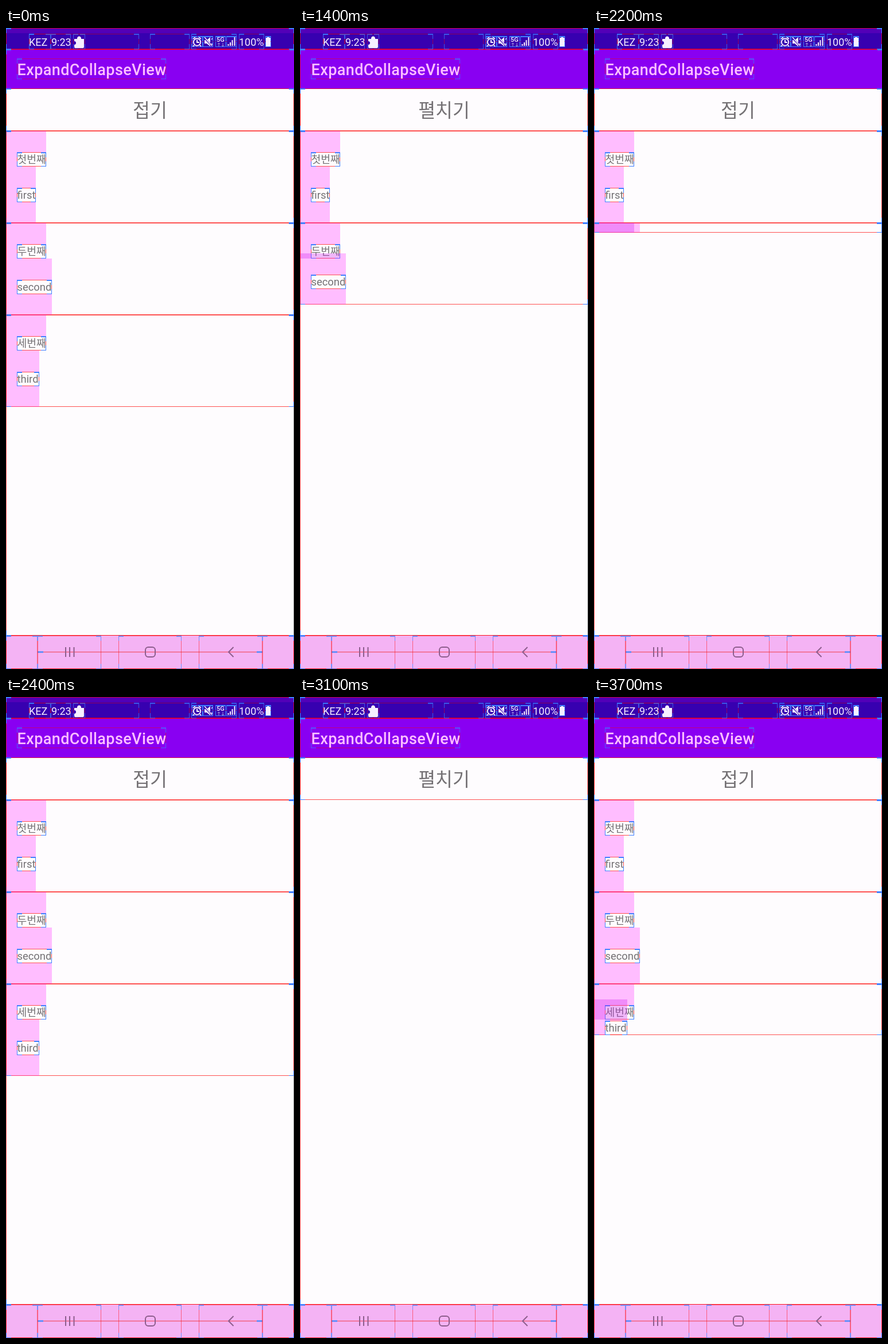
Animation, 502 px wide and 1115 px high, one loop 3800 ms. Source, as an HTML page:

```html
<!DOCTYPE html>
<html lang="ko">
<head>
<meta charset="utf-8">
<title>ExpandCollapseView</title>
<style>
@property --open-height { syntax: "<length>"; inherits: true; initial-value: 480px; }
@property --open { syntax: "<number>"; inherits: true; initial-value: 1; }

html, body { margin: 0; width: 100%; height: 100%; overflow: hidden; background: #fefcfe; }
body { font: 18.4px Roboto, "Noto Sans CJK KR", "Noto Sans CJK JP", sans-serif; color: #747174; }
#stage {
  position: relative; width: 502px; height: 1115px; overflow: hidden;
  background: linear-gradient(#999 0 0) 100% 0 / 1px 100% no-repeat;
  animation: toggle 3800ms step-end infinite;
}
#stage > *, .row > * { position: absolute; }

/* Accelerate-decelerate over 300 ms, sampled every 100 ms */
@keyframes toggle {
  0%      { --open-height: 480px; --open: 1; }
  34.21%  { --open-height: 472px; --open: 0; }
  36.84%  { --open-height: 302px; --open: 0; }
  39.47%  { --open-height: 70px;  --open: 0; }
  42.10%  { --open-height: 0px;   --open: 0; }
  55.26%  { --open-height: 7px;   --open: 1; }
  57.89%  { --open-height: 177px; --open: 1; }
  60.52%  { --open-height: 409px; --open: 1; }
  63.15%  { --open-height: 480px; --open: 1; }
  73.68%  { --open-height: 472px; --open: 0; }
  76.31%  { --open-height: 302px; --open: 0; }
  78.94%  { --open-height: 70px;  --open: 0; }
  81.57%  { --open-height: 0px;   --open: 0; }
  92.10%  { --open-height: 7px;   --open: 1; }
  94.73%  { --open-height: 178px; --open: 1; }
  97.36%, 100% { --open-height: 409px; --open: 1; }
}

/* Layout bounds: red outline with blue corners */
.box::before, .box::after {
  content: ""; position: absolute; inset: 0; box-sizing: border-box; pointer-events: none;
}
.box::before { border: 1px solid rgb(255 0 0 / .68); }
.box::after {
  border: solid #3f7fff; border-width: 2px 1px 1px;
  --dot: linear-gradient(#000 0 0);
  mask: var(--dot) 0 0, var(--dot) 100% 0, var(--dot) 0 100%, var(--dot) 100% 100%;
  mask-size: 9px 9px; mask-repeat: no-repeat;
}
.box.faint { opacity: .7; }

.status { width: 502px; height: 37px; background: linear-gradient(#5200b8 9px, #3700b0 9px); }
.toolbar { top: 37px; width: 502px; height: 69px; background: #8900f2; }
.nav { top: 1056px; width: 502px; height: 59px; background: #f4b3f4; }
.title {
  left: 19.5px; top: 55px; color: #ffbfff; white-space: nowrap;
  font-size: 27px; font-weight: 500; letter-spacing: .4px; line-height: 36px;
}
.button { top: 108px; width: 502px; text-align: center; font-size: 32.5px; line-height: 73px; }
.fold { opacity: var(--open); }
.unfold { opacity: calc(1 - var(--open)); }

.row {
  --height: clamp(0px, var(--open-height) - 160px * var(--i), 160px);
  left: 0; top: calc(179px + 160px * var(--i)); width: 502px; height: var(--height);
  overflow: hidden;
}
.label {
  left: 0; top: 0; width: var(--w); height: 25px; line-height: 25px;
  white-space: nowrap; text-indent: .5px;
  border: solid rgb(255 0 255 / .25); border-width: 37px 0 0 19px;
}
/* The second label centres in the space left below the first; overlapping margins look deeper */
.label + .label {
  top: calc(50% - 18px); border-bottom-width: 36px;
  background: linear-gradient(rgb(0 143 160 / .08) 0 0) no-repeat border-box;
  background-size: min(100%, 70px) clamp(0px, 80px - var(--height) / 2, 37px);
}
.korean { --w: 51px; font-size: 18.2px; }
svg { left: 0; top: 0; }
</style>
</head>
<body>
<div id="stage">
  <div class="status"></div>
  <div class="toolbar"></div>
  <div class="title">ExpandCollapseView</div>
  <div class="nav"></div>
  <div class="button fold">접기</div>
  <div class="button unfold">펼치기</div>

  <div class="row box" style="--i:0">
    <div class="label box korean">첫번째</div>
    <div class="label box" style="--w:33px">first</div>
  </div>
  <div class="row box" style="--i:1">
    <div class="label box korean">두번째</div>
    <div class="label box" style="--w:61px">second</div>
  </div>
  <div class="row box" style="--i:2">
    <div class="label box korean">세번째</div>
    <div class="label box" style="--w:39px">third</div>
  </div>

  <svg width="502" height="1115" fill="#f6f0ff">
    <g font-size="18">
      <text x="40" y="31">KEZ</text>
      <text x="79" y="31">9:23</text>
      <text x="406" y="31">100%</text>
    </g>
    <path d="M119 19h5a3.6 3.6 0 1 1 7 0h5v14q0 2-2 2h-13q-2 0-2-2v-4a3 3 0 0 0 0-6z"/>
    <!-- alarm -->
    <g fill="none" stroke="#f6f0ff" stroke-width="2">
      <circle cx="333" cy="24.5" r="6.2"/>
      <path d="M326 19l4-3M340 19l-4-3M333 20.500v4.500h4M328 30l-2 2M338 30l2 2"/>
    </g>
    <!-- muted speaker -->
    <path d="M346 21h4l6-5v16l-6-5h-4z"/>
    <path d="M345 16l14 15" stroke="#3700b0" stroke-width="3"/>
    <path d="M346 16l13 15M358 20l2-2M358 27l2 2" stroke="#f6f0ff" stroke-width="1.500"/>
    <text x="367" y="24" font-size="11" font-weight="500">5G</text>
    <path d="M371 32v-6m-2 2l2-2 2 2M378 26v6m-2-2l2 2 2-2" fill="none" stroke="#a79be0"/>
    <path d="M387.500 31v-3M391 31v-6M394.500 31v-10M398.500 31v-15" stroke="#f6f0ff" stroke-width="2"/>
    <path d="M455 15h4v2h2v15h-8v-15h2z"/>
    <!-- navigation -->
    <path d="M55 1085.500h392" stroke="#f0607c" stroke-width="1.500"/>
    <path d="M55 1085.500h10M437 1085.500h10" stroke="#6790fb" stroke-width="3"/>
    <g fill="none" stroke="#8c5d8c" stroke-width="2">
      <path d="M104 1077v17M111 1077v17M118.500 1077v17M396.500 1077l-8.500 8.500 8.500 8.500"/>
      <rect x="243" y="1077" width="17" height="17" rx="5"/>
    </g>
  </svg>
</div>
<script>
const stage = document.getElementById("stage");

function addBox(faint, [left, top, right, bottom]) {
  const box = document.createElement("div");
  box.className = faint ? "box faint" : "box";
  Object.assign(box.style, {
    left: left + "px", top: top + "px",
    width: right - left + "px", height: bottom - top + "px"
  });
  stage.append(box);
}

const panels = [
  [0, 0, 502, 37], [0, 37, 503, 1057], [0, 105, 502, 179], [0, 1056, 502, 1115]
];
const statusSpans = [
  [40, 78], [78, 113], [117, 138], [40, 232], [251, 320], [323, 402], [406, 450]
];
const iconSpans = [[324, 343], [343, 361], [365, 383], [384, 402], [452, 462]];
const navSpans = [[0, 55], [55, 166], [196, 306], [336, 447], [447, 502]];

panels.forEach(p => addBox(false, p));
statusSpans.forEach(([a, b]) => addBox(true, [a, 10, b, 37]));
iconSpans.forEach(([a, b]) => addBox(false, [a, 14, b, 33]));
navSpans.forEach(([a, b]) => addBox(true, [a, 1057, b, 1115]));
addBox(true, [19, 53, 279, 89]);
</script>
</body>
</html>
```
